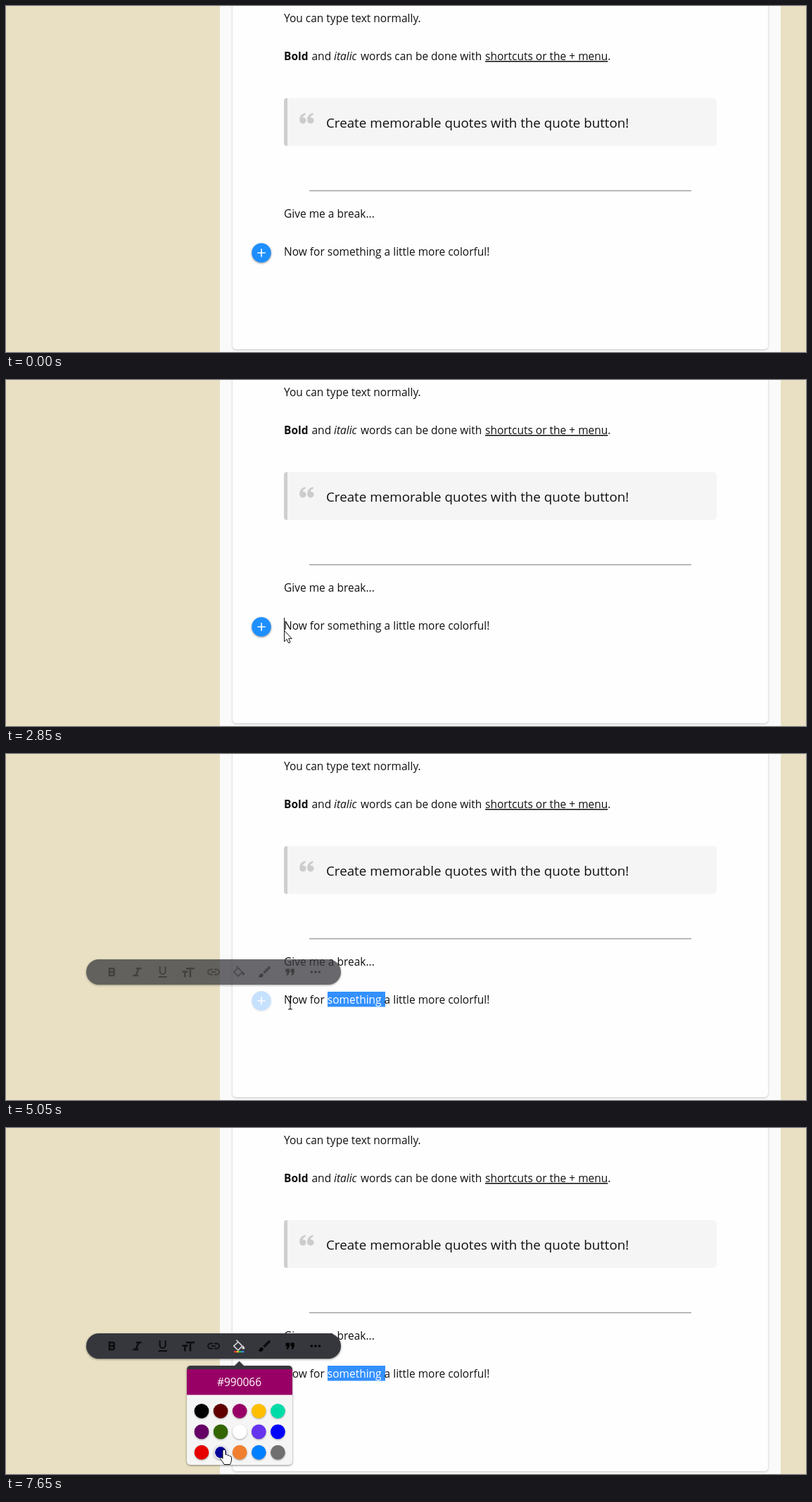
An HTML page for the animation above (8000 ms loop, 1137x492 px).

```html
<!DOCTYPE html>
<html lang="en">
<head>
<meta charset="utf-8">
<title>Editor colour menu</title>
<style>
  html, body { margin: 0; width: 100%; height: 100%; overflow: hidden; background: #e9e0c3; }
  svg { display: block; width: 100%; height: 100%; }
  text { font: 15.5px "Open Sans", "Noto Sans", sans-serif; fill: #111; white-space: pre; }
  .quote { font-size: 18.8px; }
  .card { filter: drop-shadow(0 1px 1.5px rgba(0,0,0,.22)); }
  .raised { filter: drop-shadow(0 1px 1.5px rgba(0,0,0,.45)); }
  .swatch { filter: drop-shadow(0 1px 1px rgba(0,0,0,.35)); }
  .line { fill: none; stroke: #0c0c0e; stroke-width: 2; }
  .pointer { fill: #fff; stroke: #111; stroke-width: 1; stroke-linejoin: round; }
</style>
</head>
<body>
<svg viewBox="0 0 1137 492" xmlns="http://www.w3.org/2000/svg">
  <defs>
    <path id="mark" fill="#ccc" d="M4.6 0A4.7 4.7 0 1 1-4.8-1Q-5-8.5 3-11L4-8.8Q0-7-.5-4.5A4.6 4.6 0 0 1 4.6 0Z"/>
    <path id="comma" d="M0-4.5h5.4v5l-2 4H.6l2-4H0z"/>
  </defs>

  <rect width="1137" height="492" fill="#e9e0c3"/>
  <rect x="304" width="797" height="492" fill="#fafafa"/>
  <rect class="card" x="322" y="-20" width="761" height="508" rx="5" fill="#fefefe"/>

  <text x="395" y="23">You can type text normally.</text>
  <text y="77"><tspan x="395" font-weight="bold">Bold</tspan><tspan x="434.5">and</tspan><tspan x="466" font-style="italic">italic</tspan><tspan x="504">words can be done with</tspan><tspan x="681" text-decoration="underline">shortcuts or the + menu</tspan>.</text>

  <rect x="395" y="131" width="615" height="68" rx="5" fill="#f5f5f5"/>
  <path d="M400 131v68h-1a4 4 0 0 1-4-4v-60a4 4 0 0 1 4-4z" fill="#cfcfcf"/>
  <use href="#mark" x="422" y="163"/>
  <use href="#mark" x="433" y="163"/>
  <text class="quote" x="455" y="173">Create memorable quotes with the quote button!</text>

  <rect x="431" y="262" width="543" height="1" fill="#9c9c9c"/>
  <rect x="431" y="263" width="543" height="1" fill="#dcdcdc"/>
  <text x="395" y="301">Give me a break...</text>

  <rect id="selection" x="457" y="338" width="82" height="21.5" fill="#3390ff"/>
  <text x="395" y="355">Now for <tspan id="word">something</tspan> a little more colorful!</text>
  <rect id="caret" x="395" y="338" width="1" height="22" fill="#111"/>

  <g id="plus">
    <circle class="raised" cx="363" cy="351" r="13.7" fill="#1e8fff"/>
    <path d="M357.3 351h11.4M363 345.3v11.4" stroke="#fff" stroke-width="1.6"/>
  </g>

  <g id="toolbar">
    <rect class="raised" x="114" y="292" width="362" height="36" rx="18" fill="#36373d"/>
    <g id="icons"></g>
    <g id="bucket" transform="translate(331.3 310)">
      <path class="line" d="M-4-8.5 4.5 0-1.5 6-7.5 0-1-6" style="stroke:inherit;stroke-width:1.7"/>
      <path d="M6-.5q4 5 0 5t0-5" stroke="none"/>
      <g id="bar"></g>
    </g>
  </g>

  <g id="popup">
    <g class="raised">
      <path d="M331.5 331.5l7 7h-14z" fill="#36373d"/>
      <rect x="257" y="338" width="150" height="141" rx="5" fill="#f5f5f5"/>
    </g>
    <path d="M257 343a5 5 0 0 1 5-5h140a5 5 0 0 1 5 5z" fill="#36373d"/>
    <rect x="257" y="343" width="150" height="36.5" fill="#990066"/>
    <text x="331.5" y="367" text-anchor="middle" style="fill:#fff">#990066</text>
    <g id="swatches"></g>
  </g>

  <g id="cursor">
    <path id="arrow" class="pointer" d="M.5.5V16l3.6-3.4L6.6 18l2.5-1.1-2.4-5.2h4.6z"/>
    <path id="beam" class="line" style="stroke-width:1.1" d="M-3-9h2l1 1 1-1h2M0-8V8M-3 9h2l1-1 1 1h2"/>
    <path id="hand" class="pointer" d="M-2 2Q0-1.5 2 2V7.5Q4 6.5 5 8.5 7 7.5 8 9.5 10 9 10.5 11.5V15Q10 18.5 8.5 21.5H0Q-2 17-5.6 13.5-5.5 10-2 13Z"/>
  </g>
</svg>
<script>
const $ = id => document.getElementById(id);
const LOOP = 8000, STEP = 78.2, START = 490;

function add(parent, tag, attrs) {
  const el = document.createElementNS("http://www.w3.org/2000/svg", tag);
  for (const name in attrs) el.setAttribute(name, attrs[name]);
  return parent.appendChild(el);
}

// Toolbar slots: [slot, path, stroke width]
const ICONS = [
  [0, "M-3.3-5H1A2.5 2.5 0 0 1 1 0H-3.3M1 0H1.5A2.6 2.6 0 0 1 1.5 5.1H-3.3V-6.2", 2.5],
  [1, "M-1.5-5H6M-6 5H1.5M2.2-5-2.2 5", 2.4],
  [2, "M-4-8V-1A4 4 0 0 0 4-1V-8M-6 7H6", 2],
  [3, "M-3-5H9M3-5V7.5M-8.5-.5H-.5M-4.5-.5V7.5", 2.5],
  [4, "M-1-3.7H-4.3A3.7 3.7 0 0 0-4.3 3.7H-1M1-3.7H4.3A3.7 3.7 0 0 1 4.3 3.7H1M-3.5 0H3.5", 1.7],
  [6, "M7.5-7.2-1 1.3", 3.6]
];
const slot = i => `translate(${150.3 + 36.2 * i} 310)`;
for (const [i, d, width] of ICONS)
  add($("icons"), "path", { d, class: "line", transform: slot(i), style: `stroke-width:${width}` });
add($("icons"), "path", { d: "M-4.5 2a2.6 2.6 0 0 1 2.6 2.6c0 3-4 4.5-7 1.6 2 0 1.8-4.2 4.4-4.2", transform: slot(6) });
for (const x of [-6.2, .8]) add($("icons"), "use", { href: "#comma", x, transform: slot(7) });
for (const cx of [-5.5, 0, 5.5]) add($("icons"), "circle", { cx, r: 1.8, transform: slot(8) });

["#f33", "#fc0", "#2c6", "#39f"].forEach((fill, i) =>
  add($("bar"), "rect", { x: -7.5 + 3.6 * i, y: 7.2, width: 3.6, height: 2, fill }));

const COLORS = ("#000 #600000 #990066 #ffbf00 #00dca8 #660066 #336600 #fff " +
  "#6633ee #00f #e60000 #000099 #f08030 #0080ff #707070").split(" ");
const swatches = COLORS.map((fill, i) => {
  const cx = 278 + 27.1 * (i % 5), cy = 402.5 + 29.4 * Math.floor(i / 5);
  const ring = add($("swatches"), "circle", { cx, cy, r: 10.3, class: "swatch", fill });
  const dot = add($("swatches"), "circle", { cx, cy, r: 10, fill });
  return { cx, cy, fill, ring, dot };
});

// Pointer path: [step, x, y]
const PATH = [
  [0, 747, 477], [4, 480, 438], [8, 296, 395], [9, 322, 384], [10, 335, 375],
  [14, 372, 361], [19, 391, 355], [22, 391, 355], [24, 395, 356], [32, 395, 356],
  [34, 425, 354], [38, 522, 352], [43, 437, 356], [45, 429, 356], [46, 429, 356],
  [51, 475, 348], [55, 475, 347], [59, 380, 356], [60, 380, 356], [61, 375, 348],
  [62, 375, 348], [68, 342, 303.5], [76, 342, 303.5], [82, 333, 378], [84, 290, 408],
  [85, 265, 424], [86, 271, 430], [87, 296, 437], [91, 310, 456.5]
];

function pointerAt(step) {
  const next = PATH.findIndex(key => key[0] > step);
  if (next < 0) return PATH[PATH.length - 1].slice(1);
  if (next === 0) return PATH[0].slice(1);
  const [s0, x0, y0] = PATH[next - 1], [s1, x1, y1] = PATH[next];
  const p = (step - s0) / (s1 - s0);
  return [x0 + (x1 - x0) * p, y0 + (y1 - y0) * p];
}

const show = (id, on) => $(id).setAttribute("display", on ? "inline" : "none");
const fade = (step, from, count) => Math.max(0, Math.min(1, (step - from + 1) / count));
const within = (v, a, b) => v >= a && v < b;

function draw(time) {
  const step = Math.floor((time - START) / STEP);
  const [x, y] = pointerAt(step);
  const open = step >= 73, selected = step >= 53;

  const onBucket = step >= 63 && within(x, 313, 350) && within(y, 292, 328);
  let hand = onBucket;
  for (const s of swatches) {
    const hover = open && Math.hypot(x - s.cx, y - s.cy) < 10;
    hand = hand || hover;
    s.ring.setAttribute("fill", hover ? "#e4e4ea" : s.fill);
    s.dot.setAttribute("r", hover ? 8 : 10);
  }
  const beam = within(step, 33, 61);

  show("cursor", step >= 0);
  $("cursor").setAttribute("transform", `translate(${Math.round(x)} ${Math.round(y)})`);
  show("hand", hand);
  show("beam", beam);
  show("arrow", !hand && !beam);

  show("caret", within(step, 28, 35) || within(step, 42, 49));
  show("selection", selected);
  $("word").style.fill = selected ? "#fff" : "#111";

  const bar = fade(step, 56, 4);
  $("toolbar").setAttribute("opacity", bar);
  $("plus").setAttribute("opacity", 1 - bar);
  $("popup").setAttribute("opacity", fade(step, 73, 3));

  const tint = onBucket || open ? "#d4d4d8" : "#0c0c0e";
  $("bucket").setAttribute("fill", tint);
  $("bucket").setAttribute("stroke", tint);
  $("bar").setAttribute("stroke", "none");
  $("bar").setAttribute("opacity", open ? 1 : onBucket ? .45 : 0);
}

function tick() {
  draw(performance.now() % LOOP);
  requestAnimationFrame(tick);
}
tick();
</script>
</body>
</html>
```
